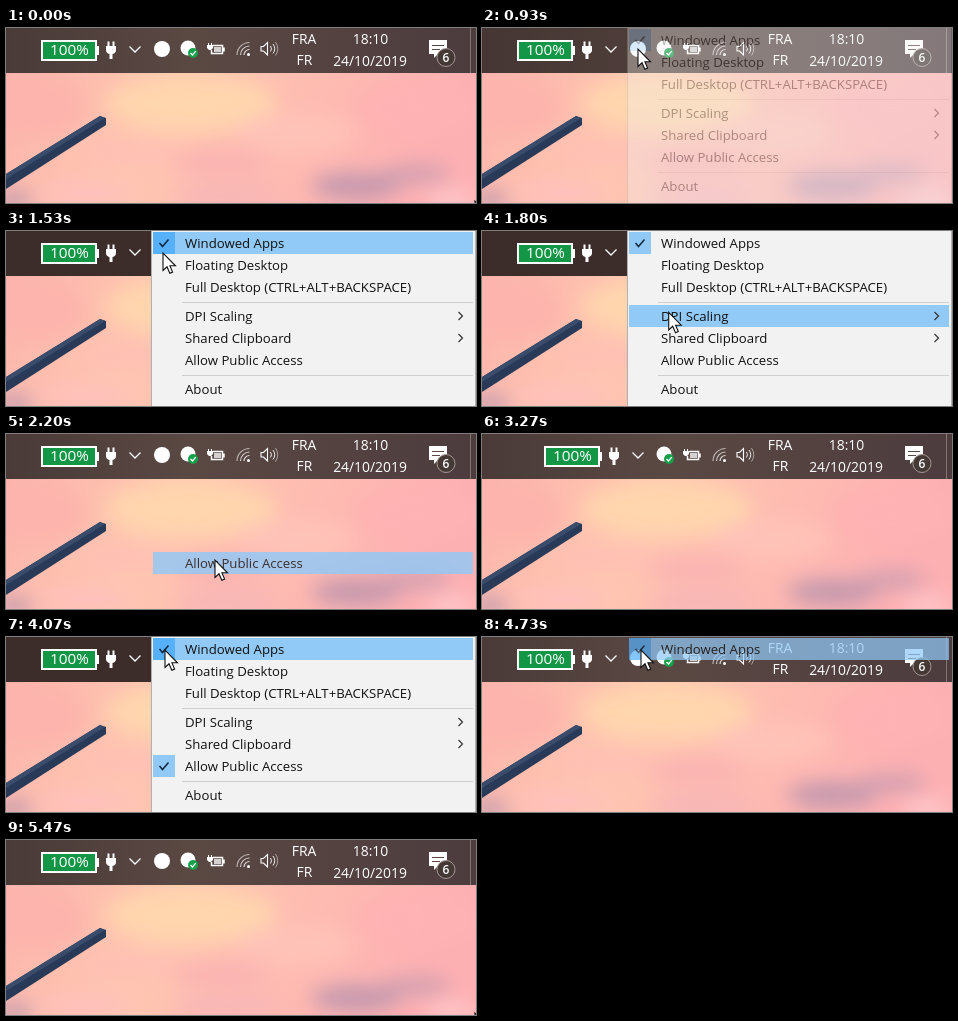
An HTML page that plays this animation: 470x175 px, repeating every 5540 ms.

```html
<!DOCTYPE html>
<html lang="en">
<head>
<meta charset="utf-8">
<title>Tray menu</title>
<style>
html, body { margin: 0; width: 100%; height: 100%; overflow: hidden; background: #fbb6b0; }
svg { display: block; width: 470px; height: 175px; }
text { font-family: "Open Sans", "Noto Sans", sans-serif; white-space: pre; }
.bar text { font-size: 13.9px; fill: #fff; }
.item text { font-size: 13.2px; fill: #111; }
.line { fill: none; stroke: #fff; }
</style>
</head>
<body>
<svg viewBox="0 0 470 175">
  <defs>
    <linearGradient id="sky" x2="1" y2=".2">
      <stop offset="0" stop-color="#fbb0ab"/>
      <stop offset=".4" stop-color="#ffc7b0"/>
      <stop offset="1" stop-color="#fdb0b2"/>
    </linearGradient>
    <linearGradient id="barFill">
      <stop offset="0" stop-color="#4a3b38"/>
      <stop offset=".4" stop-color="#5a4843"/>
      <stop offset="1" stop-color="#4d3c3e"/>
    </linearGradient>
    <filter id="soft" x="-50%" y="-80%" width="200%" height="260%"><feGaussianBlur stdDeviation="10"/></filter>
  </defs>

  <rect width="470" height="175" fill="url(#sky)"/>
  <g id="clouds" filter="url(#soft)"></g>
  <path d="M0 146L94 88L100 90V97L0 161Z" fill="#293a58"/>
  <path d="M0 146L94 88L99 90L0 151Z" fill="#3a4c6c"/>

  <g class="bar">
    <rect width="470" height="45" fill="url(#barFill)"/>
    <rect id="dim" width="146" height="45" fill="#3c2d2a"/>
    <rect id="hover" width="27" height="45" fill="#fff" opacity=".12"/>
    <g id="left">
      <rect x="36" y="13" width="54" height="19" fill="#149647" stroke="#fff" stroke-width="2"/>
      <rect x="91" y="18" width="2" height="9" fill="#fff"/>
      <text x="63.500" y="27.300" text-anchor="middle" style="font-size:15.300px">100%</text>
      <path d="M101.500 13.500h2v4.500h3v-4.500h2v4.500h1.500v4q0 3-3.500 4v5h-3v-5q-3.500-1-3.500-4v-4h1.500Z" fill="#fff"/>
      <path class="line" d="M123.500 18.500L129 24L134.500 18.500" stroke-width="1.300"/>
    </g>
    <circle id="app" cx="156" cy="21" r="8" fill="#fff"/>
    <circle cx="182" cy="20" r="7.500" fill="#fff"/>
    <circle cx="187" cy="25" r="5" fill="#17a04a"/>
    <path class="line" d="M184.500 25l2 2l3.200-3.800" stroke-width="1.300"/>
    <path class="line" d="M207 17.500H216.500V25.500H205.500V22M218 19.500v4" stroke-width="1.500"/>
    <path d="M208 19h7v5h-7Z" fill="#fff" opacity=".75"/>
    <path d="M202 15h1v2h2v-2h1v2h1v3l-2 2h-2l-2-2v-3h1Z" fill="#fff"/>
    <g class="line" stroke-width="1.200">
      <path d="M231 27A12.500 12.500 0 0 1 243.500 14.500" opacity=".6"/>
      <path d="M234.500 27A9 9 0 0 1 243.500 18" opacity=".7"/>
      <path d="M238 27A5.500 5.500 0 0 1 243.500 21.500" opacity=".8"/>
    </g>
    <circle cx="242.500" cy="26.500" r="1.500" fill="#fff"/>
    <path class="line" d="M255 18.500h2.500l4-4v12.500l-4-4H255Z" stroke-width="1.100"/>
    <path class="line" d="M264.500 18q2 2.800 0 5.500M267 16q3.500 4.800 0 9.500" opacity=".9"/>
    <path class="line" d="M269.500 14q4.500 6.800 0 13.500" opacity=".5"/>
    <text x="298" y="16" text-anchor="middle">FRA</text>
    <text x="298.500" y="37" text-anchor="middle">FR</text>
    <text x="364.500" y="16" text-anchor="middle">18:10</text>
    <text x="364" y="38" text-anchor="middle">24/10/2019</text>
    <path d="M423 12H441V26H432L428 30V26H423Z" fill="#fff"/>
    <path d="M426 17.500h12M426 21.500h8" stroke="#5a4843"/>
    <circle cx="440" cy="29.500" r="9" fill="#453936" stroke="#a39894"/>
    <text x="440" y="34" text-anchor="middle" style="font-size:12px;font-weight:600">6</text>
    <path d="M464.500 0V45" stroke="#84766f"/>
  </g>

  <g id="menu">
    <rect x="145.500" y="-1" width="324" height="180" fill="#f2f2f2" stroke="#b4b0b0"/>
    <path d="M176 71.500H467M176 144.500H467" stroke="#cfcfcf"/>
    <g id="rows"></g>
  </g>
  <g id="ghost"></g>
  <path id="cursor" d="M0 0V17.500L4 13.800L6.800 20.300L9.600 19.100L6.900 12.800H12.500Z" fill="#fff" stroke="#111" stroke-width="1.100"/>
</svg>

<script>
const LOOP = 5540, FPS = 15;
const $ = id => document.getElementById(id);

// cx, cy, rx, ry, colour
const clouds = [
  [185, 75, 85, 28, "#ffd6ae"], [35, 80, 45, 30, "#fdb4ac"], [410, 80, 60, 25, "#ffb2b3"],
  [290, 105, 60, 20, "#ffc2b8"], [120, 125, 50, 14, "#ffc0b4"], [215, 135, 50, 14, "#fab3b2"],
  [350, 158, 45, 13, "#c398ae"], [410, 146, 35, 9, "#cf9fb0"], [445, 172, 25, 10, "#ffc8cc"],
  [80, 165, 50, 12, "#ffc0bc"], [8, 172, 20, 8, "#bd97b0"], [220, 168, 55, 10, "#f6b4b8"]
];
$("clouds").innerHTML = clouds.map(([x, y, rx, ry, c]) =>
  `<ellipse cx="${x}" cy="${y}" rx="${rx}" ry="${ry}" fill="${c}"/>`).join("");

const items = [
  ["Windowed Apps", 12], ["Floating Desktop", 34], ["Full Desktop (CTRL+ALT+BACKSPACE)", 56],
  ["DPI Scaling", 85, true], ["Shared Clipboard", 107, true], ["Allow Public Access", 129], ["About", 158]
];

function itemMarkup([label, y, sub], lit, checked) {
  const fill = (x, w, c) => `<rect x="${x}" y="${y - 11}" width="${w}" height="22" fill="${c}"/>`;
  return `<g class="item">` +
    (lit ? fill(147, 320, "#91c9f7") : "") +
    (checked ? fill(147, 22, lit ? "#56b0fa" : "#90c8f6") +
      `<path d="M153.500 ${y}l3 3.500l6-7" fill="none" stroke="#12263c" stroke-width="1.500"/>` : "") +
    `<text x="179" y="${y + 5}">${label}</text>` +
    (sub ? `<path d="M452.500 ${y - 4}l4 4l-4 4" fill="none" stroke="#333" stroke-width="1.200"/>` : "") +
    `</g>`;
}

// tick, x, y
const path = [
  [0, 469, 173], [1, 469, 173], [10, 198, 37], [11, 156, 21], [22, 156, 21], [23, 157, 22],
  [30, 209, 126], [33, 209, 126], [36, 250, 180], [51, 250, 180], [52, 140, 21], [55, 140, 21],
  [57, 159, 13], [71, 159, 13], [76, 469, 173], [84, 469, 173]
];

function cursorAt(n) {
  const i = path.findIndex(p => p[0] > n);
  const [t0, x0, y0] = path[i - 1], [t1, x1, y1] = path[i];
  const k = (n - t0) / (t1 - t0);
  return [x0 + (x1 - x0) * k, y0 + (y1 - y0) * k];
}

const within = (n, a, b) => n >= a && n < b;
const show = (id, on) => $(id).setAttribute("visibility", on ? "visible" : "hidden");

function menuOpacity(n) {
  if (within(n, 14, 33)) return Math.min(1, (n - 13) / 3);
  if (within(n, 60, 71)) return Math.min(1, (n - 59) / 2);
  return 0;
}

function draw(n) {
  const [x, y] = cursorAt(n);
  $("cursor").setAttribute("transform", `translate(${x} ${y})`);

  const gone = n === 49;
  show("app", !gone);
  $("left").setAttribute("transform", `translate(${gone ? 27 : 0} 0)`);

  const onChevron = within(n, 52, 56);
  show("hover", onChevron || within(n, 56, 60));
  $("hover").setAttribute("x", onChevron ? 116 : 143);

  const open = menuOpacity(n);
  $("menu").setAttribute("opacity", open);
  $("dim").setAttribute("opacity", open);
  $("rows").innerHTML = open ? items.map((it, i) =>
    itemMarkup(it, n >= 23 && Math.abs(y - it[1]) < 11, i === 0 || (n >= 50 && i === 5))).join("") : "";

  // the chosen item lingers and fades after the menu closes
  const pick = within(n, 33, 38) ? [33, 5, .82] : within(n, 71, 76) ? [71, 0, .72] : null;
  $("ghost").innerHTML = pick ? itemMarkup(items[pick[1]], true, pick[1] === 0) : "";
  if (pick) $("ghost").setAttribute("opacity", pick[2] * (1 - (n - pick[0]) / 5));
}

const start = performance.now();
let last = -1;
function tick() {
  const t = (performance.now() - start) % LOOP;
  const n = Math.floor((t + 4) * FPS / 1000);
  if (n !== last) draw(last = n);
  requestAnimationFrame(tick);
}
tick();
</script>
</body>
</html>
```
